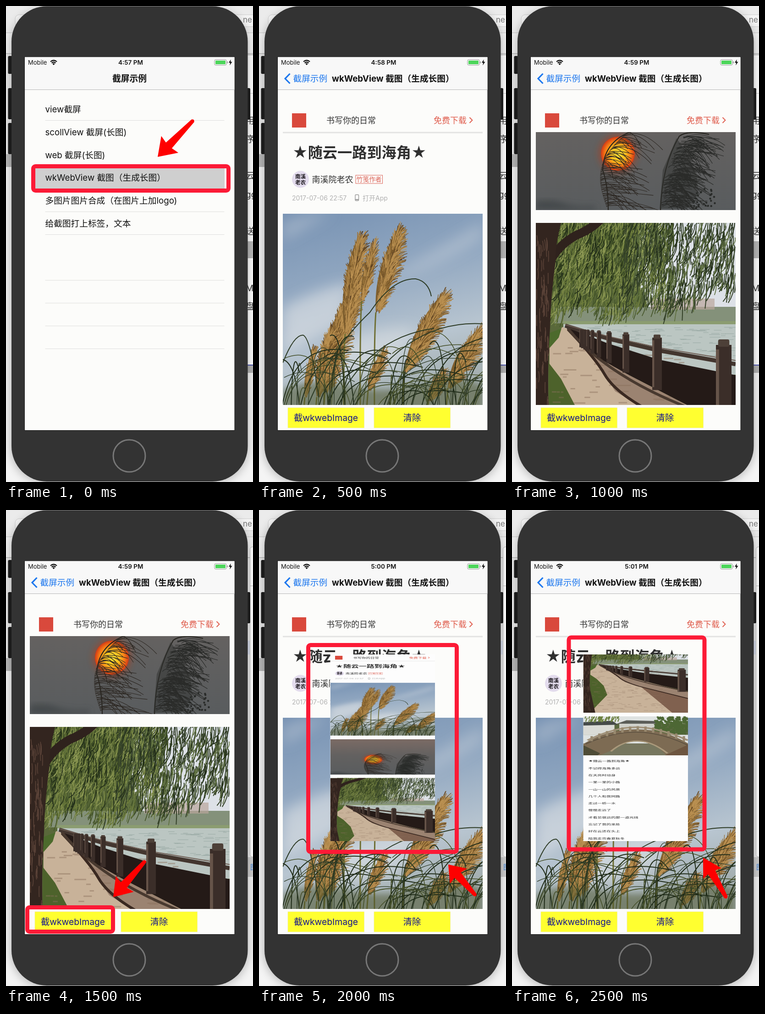
Animation of 539 by 1038 pixels, one loop 3 s. Source, as an HTML page:

```html
<!DOCTYPE html>
<html lang="zh-CN">
<head>
<meta charset="utf-8">
<title>截屏示例</title>
<style>
html, body { margin: 0; width: 100%; height: 100%; overflow: hidden; background: #fff; }
svg { display: block; }
#stage { width: 539px; height: 1038px; }
text { font-family: Inter, "Noto Sans CJK SC", "Noto Sans CJK", sans-serif; white-space: pre; }
</style>
</head>
<body>
<svg id="stage" viewBox="0 0 539 1038"></svg>
<script>
const stage = document.getElementById('stage');
const RED = '#fc1a36', BRAND = '#d9493c', INK = '#2f2f2f';

let seed = 7;
const rnd = (a = 0, b = 1) => {
  seed = (seed * 16807) % 2147483647;
  return a + (b - a) * seed / 2147483647;
};
const many = (n, f) => Array.from({ length: n }, (_, i) => f(i)).join('');
const r1 = v => v.toFixed(1);
const rect = (x, y, w, h, fill, more = '') =>
  `<rect x="${x}" y="${y}" width="${w}" height="${h}" fill="${fill}" ${more}/>`;
const poly = (pts, fill, more = '') => `<polygon points="${pts}" fill="${fill}" ${more}/>`;
const line = (d, color, w = 1, more = '') =>
  `<path d="${d}" fill="none" stroke="${color}" stroke-width="${w}" ${more}/>`;
const text = (x, y, size, s, fill = '#111', more = '') =>
  `<text x="${x}" y="${y}" font-size="${size}" fill="${fill}" ${more}>${s}</text>`;
const mid = 'text-anchor="middle"';
const show = (on, body) => `<g data-on="${on}">${body}</g>`;
const symbol = (id, h, body) =>
  `<symbol id="${id}" viewBox="0 0 436 ${h}" preserveAspectRatio="none">${body}</symbol>`;
const use = (id, x, y, w, h) =>
  `<use href="#${id}" x="${x}" y="${y}" width="${w}" height="${h}"/>`;
const frame = (x, y, w, h, s = 9) =>
  rect(x + s / 2, y + s / 2, w - s, h - s, 'none', `rx="5" stroke="${RED}" stroke-width="${s}"`);

function arrow(tx, ty, ex, ey, back = 38, wing = 26) {
  const len = Math.hypot(ex - tx, ey - ty), bx = (ex - tx) / len, by = (ey - ty) / len;
  const at = (a, p) => r1(tx + bx * a - by * p) + ',' + r1(ty + by * a + bx * p);
  return `<path fill="#fe0000" d="M${at(0, 0)}L${at(back, wing)} ${at(back - 3, 9)} ${at(len - 2, 4)}` +
    `Q${at(len + 4, 0)} ${at(len - 2, -4)}L${at(back - 3, -9)} ${at(back, -wing)}Z"/>`;
}

// Photos: each in its own 436 wide box
function plume(x1, y1, x2, y2, w) {
  const dx = x2 - x1, dy = y2 - y1, len = Math.hypot(dx, dy), ux = dx / len, uy = dy / len;
  const tones = ['#573c20', '#7c5a2b', '#957038', '#b98f50'], paths = ['', '', '', ''];
  const n = Math.round(len * w / 9);
  for (let i = 0; i < n; i++) {
    const t = rnd(0, .93), s = rnd(-1, 1);
    const hw = w * Math.sin(Math.PI * (.1 + .84 * t));
    const f = rnd(12, 28), o = s * hw * .5 + w * .15, x = x1 + dx * t - uy * o, y = y1 + dy * t + ux * o;
    paths[i % 4] += `M${r1(x)} ${r1(y)}q${r1(ux * f * .6)} ${r1(uy * f * .6)} ` +
      `${r1(ux * f - uy * o)} ${r1(uy * f + ux * o)}`;
  }
  const side = k => `${r1(x1 + dx * .45 - uy * w * k)} ${r1(y1 + dy * .45 + ux * w * k)}`;
  return line(`M${x1} ${y1}q-4 50 -3 ${430 - y1}`, '#6f6f34', 3) +
    `<path d="M${x1} ${y1}Q${side(1.2)} ${x2} ${y2}Q${side(-1.1)} ${x1} ${y1}" fill="#80602f"/>` +
    paths.map((d, i) => line(d, tones[i], 1.3)).join('');
}

function reeds() {
  const plumes = [[48, 400, 66, 297, 13], [92, 390, 133, 190, 32], [74, 400, 104, 250, 24],
    [136, 262, 166, 45, 30], [172, 190, 198, 60, 16], [203, 215, 253, 28, 27],
    [265, 345, 352, 170, 29], [360, 380, 428, 250, 27], [186, 385, 216, 305, 18], [318, 410, 346, 350, 20]];
  const blades = c => many(30, () => {
    const x = rnd(-10, 420), lean = rnd(-70, 150), h = rnd(60, 190);
    return `M${r1(x)} 432Q${r1(x + lean * .25)} ${r1(432 - h)} ${r1(x + lean * 1.5)} ${r1(432 - h * rnd(.5, 1))}`;
  });
  return rect(0, 0, 436, 430, 'url(#sky)') +
    `<g filter="url(#haze)" fill="#dfe3e6">
      <path d="M436 20Q330 85 210 150Q330 125 436 50Z" opacity=".35"/>
      <path d="M0 205Q80 160 150 150L130 240Q70 270 0 310Z" opacity=".6"/>
      <path d="M0 20Q50 0 110 -5L0 60Z" opacity=".35"/>
      <path d="M120 280Q220 240 290 250L250 340 90 370Z" opacity=".5"/></g>` +
    plumes.map(p => plume(...p)).join('') +
    `<path d="M0 430V385Q60 355 140 375T300 372T436 375V430Z" fill="#4c522c" opacity=".5" filter="url(#soft)"/>` +
    line(blades(), '#202c19', 2) + line(blades(), '#454f29', 1.6) + line(blades(), '#2e3b26', 1.3) +
    line('M0 325Q25 262 45 265Q62 275 78 400M50 430Q100 300 190 215Q240 140 290 142Q318 148 324 180' +
      'M110 430Q180 270 330 250M150 430Q260 230 436 240', '#2c3a24', 2);
}

function sunset() {
  const feather = (x, y, l, d) => `M${r1(x)} ${r1(y)}q${r1(l * .45)} ${r1(-d * .7)} ${r1(l)} ${r1(d)}`;
  const one = many(76, i => {
    const t = i / 76, y = 280 - t * 160;
    return feather(154 + 46 * t * t * t - 18 * Math.sin(t * 3), y, rnd(25, 120) * (1 - t * .25), rnd(2, 34));
  });
  const two = many(170, () => {
    const t = rnd(), y = 284 - t * 160;
    return feather(273 + 48 * t * t + rnd(0, 26), y, rnd(25, 85), rnd(0, 34));
  });
  return rect(0, 0, 436, 287, 'url(#dusk)') +
    `<path d="M0 287V268Q35 262 60 272T130 278V287Z" fill="#45494b" filter="url(#soft)"/>
     <circle cx="179" cy="164" r="42" fill="#b03c1c" opacity=".55" filter="url(#soft)"/>
     <circle cx="179" cy="164" r="37" fill="url(#sun)"/>` +
    line('M158 287Q158 235 146 200Q148 135 214 114M272 287Q275 190 313 126Q330 112 378 122', '#26241f', 2.2) +
    line(one, '#2d2823', 1.1) +
    poly('270,284 277,200 307,130 328,160 350,205 355,250 330,284', '#2e302e', 'opacity=".5"') +
    line(two, '#2a2b29', 1.2) +
    many(28, () => `<circle cx="${r1(rnd(345, 395))}" cy="${r1(rnd(238, 285))}" r="2.2" fill="#292b29"/>`);
}

function willows() {
  const strands = (n, x0, x1, top, low, color, w) => line(many(n, () => {
    const x = rnd(x0, x1), y = rnd(-20, low(x)), l = rnd(12, top);
    return `M${r1(x)} ${r1(y)}q${r1(rnd(-2, 5))} ${r1(l * .5)} ${r1(rnd(-14, 2))} ${r1(l)}`;
  }), color, w);
  const low = x => 185 + 14 * Math.sin(x / 22) - Math.max(0, x - 225) * .24;
  const shade = x => low(x) * .6;
  const posts = many(10, i => {
    const k = 1 / (1 + .66 * i + .12 * i * i);
    const x = 78 + 332 * k, w = 4 + 30 * k, y = 230 + 24 * k, h = 30 + 150 * k;
    return rect(r1(x - w / 2), r1(y + 12 * k), r1(w), r1(h), '#3b2e29') +
      rect(r1(x - w * .36), r1(y), r1(w * .72), r1(16 * k), '#4d4038', `rx="${r1(4 * k)}"`) +
      rect(r1(x - w / 2), r1(y + 22 * k), r1(w * .2), r1(h - 12), '#665449');
  });
  return rect(0, 0, 436, 616, '#59683a') +
    poly('230,0 436,0 436,200 250,195 215,110', '#dde1e7') +
    rect(40, 183, 396, 36, '#84917a') + rect(250, 165, 140, 24, '#b9a69c', 'opacity=".7"') +
    rect(60, 214, 376, 8, '#8b9c70') + rect(60, 221, 376, 110, '#bbc6c2') +
    line(many(140, () => `M${r1(rnd(90, 430))} ${r1(rnd(225, 290))}h${r1(rnd(6, 25))}`), '#9aaaa5', 1) +
    poly('58,227 30,260 28,616 436,616 436,500 240,400 150,325 80,235', '#c8b299') +
    poly('70,232 148,327 173,367 228,400 370,470 436,500 436,445 330,397 200,330', '#9b8371') +
    poly('240,405 436,500 436,616 370,616', '#80614f') +
    poly('28,305 55,340 85,397 100,470 28,616', '#4d622b') +
    poly('30,240 56,230 50,250 28,275', '#4c6a2c') +
    line(many(150, () => `M${r1(rnd(35, 330))} ${r1(rnd(270, 600))}h${r1(rnd(5, 30))}`), '#8b6f5c', 3, 'opacity=".45"') +
    line('M70 232Q130 295 150 330T232 401L436 500', '#3a2921', 6) +
    poly('64,226 155,262 268,298 436,332 436,440 330,397 200,330 120,285', '#241a17') +
    line('M64 224L160 253 268 278 436 308', '#43362f', 9) + line('M64 222L160 248 268 272 436 300', '#6d5c53', 2) +
    line('M70 230Q150 330 330 402L436 445', '#48392f', 6) + posts +
    strands(700, 30, 300, 50, shade, '#2b381a', 1.8) + strands(700, 30, 300, 45, low, '#46562a', 1.7) +
    strands(620, 30, 290, 38, low, '#6c7b3b', 1.4) + strands(330, 35, 280, 30, low, '#939e58', 1.2) +
    strands(330, 190, 436, 55, low, '#36432a', 2) + strands(200, 210, 436, 40, low, '#5f7040', 1.7) +
    strands(160, 30, 436, 40, low, '#222e19', 1.7) +
    line('M32 82Q50 48 88 27Q120 14 140 -6', '#2f221d', 19) +
    `<path d="M0 0H55Q42 50 43 84Q32 170 31 230Q24 330 29 430L50 616H0Z" fill="#33251f"/>` +
    line(many(110, () => `M${r1(rnd(1, 28))} ${r1(rnd(20, 590))}q${r1(rnd(-3, 4))} 12 0 24`), '#5b4338', 1.6);
}

function bridge() {
  const rail = many(13, i => rect(30 + i * 32, r1(172 - 92 * Math.sin(Math.PI * (i + .5) / 13)), 10, 42, '#998a70'));
  return rect(0, 0, 436, 317, '#dfe3e2') + rect(0, 60, 436, 90, '#5a6840') +
    rect(0, 66, 130, 85, '#dadbd6') + poly('0,48 120,35 145,68 0,75', '#454a49') +
    rect(150, 55, 150, 60, '#cfd0ca') + poly('140,60 180,32 300,38 315,60', '#5b5d58') +
    line(many(170, () => `M${r1(rnd(290, 436))} ${r1(rnd(-5, 130))}q8 8 5 22`), '#4d6734', 9) +
    line(many(50, () => `M${r1(rnd(0, 150))} ${r1(rnd(-8, 25))}q-4 10 -5 25`), '#6c803f', 4) +
    rect(0, 220, 436, 97, '#77775f') +
    `<path d="M0 317V225Q100 105 220 105T436 220V317H345Q300 205 225 205T125 270L70 317Z" fill="#7d6b53"/>` +
    line('M18 195Q130 88 220 88T436 195', '#a1927a', 12) + line('M10 225Q120 128 220 128T436 235', '#554a3c', 5) + rail +
    line('M115 285Q165 200 225 200T350 300', '#aa997b', 9) +
    poly('0,235 70,300 60,317 0,317', '#4e4c37') + poly('436,230 340,317 436,317', '#6d5540');
}

const headBody = rect(72, 234, 31, 31, BRAND) + text(147, 256, 18, '书写你的日常', '#333') +
  text(381, 256, 18, '免费下载', '#df5b4b') + line('M459.5 243l6 6-6 6', '#df5b4b', 1.8);
const article =
  text(73, 331, 32.2, '★随云一路到海角★', INK, 'font-weight="700"') +
  '<circle cx="90.5" cy="378" r="18.5" fill="#e3dced"/>' +
  text(90.5, 376, 11.5, '南溪', '#1b171c', mid + ' font-weight="700"') +
  text(90.5, 389, 11.5, '老农', '#1b171c', mid + ' font-weight="700"') +
  text(115.5, 385, 18, '南溪院老农', INK, 'font-weight="500"') +
  rect(211, 369, 58.5, 18, 'none', 'stroke="#dc6458"') + text(212.8, 383, 13.7, '竹笺作者', '#dc6458') +
  text(72, 423.5, 14, '2017-07-06 22:57', '#b1b1b1') +
  rect(210, 411.5, 7.5, 13, 'none', 'rx="1.5" stroke="#999" stroke-width="1.4"') + line('M210 422h8', '#999', 2) +
  text(226, 423.5, 14, '打开App', '#b1b1b1');
const rule = rect(52, 274.5, 436, 3, '#e3e3e2');

const defs = `<defs>
  <linearGradient id="sky" x2=".25" y2="1"><stop stop-color="#7792b3"/><stop offset=".4" stop-color="#92a8c1"/>
    <stop offset=".75" stop-color="#b8c5d0"/><stop offset="1" stop-color="#a4afb0"/></linearGradient>
  <linearGradient id="dusk" x2="0" y2="1"><stop stop-color="#7b6b65"/><stop offset=".45" stop-color="#636160"/>
    <stop offset="1" stop-color="#595c5e"/></linearGradient>
  <radialGradient id="sun"><stop stop-color="#ffe53a"/><stop offset=".45" stop-color="#ffbf1e"/>
    <stop offset=".75" stop-color="#f77b16"/><stop offset="1" stop-color="#d23a16"/></radialGradient>
  <filter id="soft" x="-30%" y="-30%" width="160%" height="160%"><feGaussianBlur stdDeviation="7"/></filter>
  <filter id="haze" x="-30%" y="-30%" width="160%" height="160%"><feGaussianBlur stdDeviation="15"/></filter>
  <filter id="shade" x="-10%" y="-10%" width="120%" height="120%"><feGaussianBlur stdDeviation="11"/></filter>
  <clipPath id="web"><rect x="41" y="275" width="458" height="595"/></clipPath>
  ${symbol('reeds', 430, reeds())}${symbol('sunset', 287, sunset())}
  ${symbol('willows', 616, willows())}${symbol('bridge', 317, bridge())}
  <g id="head">${headBody}</g><g id="article">${article}</g></defs>`;

const scraps = [['用', 257], ['序', 297], ['云', 377], ['gg', 418], ['送', 498], ['M', 622], ['盘', 662]];
const desk = rect(0, 0, 539, 1038, '#f4f4f4') + rect(0, 0, 539, 58, '#ebebeb') +
  rect(20, 19, 540, 26, '#f4f4f4', 'rx="9" stroke="#ccc"') +
  text(517, 36, 17, 'ne', '#777') + rect(0, 58, 539, 1, '#c5c5c5') + rect(0, 59, 539, 44, '#f2f2f2') +
  rect(0, 103, 539, 1.5, '#b5b5b5') + rect(0, 105, 14, 218, '#e9e9e9') + rect(0, 323, 14, 28, '#b9b9b9') +
  show('012', rect(520, 105, 19, 678, '#fff') + rect(520, 106, 19, 1, '#999') + rect(520, 190, 19, 1, '#ccc') +
    rect(520, 513, 19, 37, '#b9b9b9') + scraps.map(([s, y]) => text(523, y, 19, s, '#333')).join('') +
    rect(520, 782, 19, 2, '#4c54b0') + rect(520, 784, 19, 16, '#b3b3b3')) +
  show('345', rect(520, 105, 19, 678, '#efefef') + rect(520, 285, 19, 30, '#dce2f2') +
    rect(520, 757, 19, 43, '#cfcfcf') + text(533, 784, 15, '图', '#3b82d8') +
    rect(532.5, 80.5, 30, 676, '#fff', 'rx="5" stroke="#b5b5b5"') + rect(533, 165, 6, 1, '#bbb'));

const key = (x, y, h) => rect(x, y, 9, h, '#1b1b1b', 'rx="2.5"');
const phone = rect(12, 8, 515, 1030, '#000', 'rx="77" opacity=".3" filter="url(#shade)"') +
  key(4.5, 109, 39) + key(4.5, 179, 68) + key(4.5, 255, 68) + key(524, 179, 68) +
  rect(12, .5, 515.5, 1036.5, '#333', 'rx="77"') + rect(40, 110.5, 459.5, 815.5, '#1c1c1c') +
  rect(41, 111.5, 457.5, 813.5, '#fcfcfa') + rect(41, 111.5, 457.5, 71, '#f8f8f8') +
  rect(41, 182, 457.5, 1, '#b7b7b7') +
  '<circle cx="269" cy="981" r="35" fill="none" stroke="#777" stroke-width="3"/>';

const status = text(48, 128, 13, 'Mobile') +
  line('M97 121.5Q104 115.5 111 121.5M99.6 124.3Q104 120.5 108.4 124.3', '#111', 2.2) +
  poly('101.3,126 104,124.5 106.7,126 104,129', '#111') +
  `<text id="clock" x="272" y="128" font-size="13.5" font-weight="600" fill="#111" ${mid}></text>` +
  rect(455, 117, 26, 12, '#fff', 'rx="2.8" stroke="#8d8d8d"') + rect(457, 119, 22, 8, '#4cd55a', 'rx="1"') +
  rect(482.3, 121, 1.5, 4, '#8d8d8d') + poly('490.5,116.5 486,123.8 489.2,123.8 488.2,129.5 493.5,121.8 490.2,121.8', '#111');

const rows = ['view截屏', 'scollView 截屏(长图)', 'web 截屏(长图)', 'wkWebView 截图（生成长图）',
  '多图片图片合成（在图片上加logo)', '给截图打上标签，文本'];
const list = text(269.5, 165, 18.8, '截屏示例', '#111', mid + ' font-weight="700"') +
  [0, 4, 5, 7, 8, 9, 10].map(i => rect(85.5, r1(249 + i * 49.8), 391, 1, '#dededd')).join('') +
  rect(60, 350, 417, 48.5, '#cfcfcf') +
  rows.map((s, i) => text(85.5, r1(232 + i * 49.8), 18.7, s)).join('') +
  frame(55, 345, 435, 62) + arrow(331, 329, 409, 249);

const button = (x, label) => rect(x, 876, 166.5, 44, '#ffff30', 'stroke="#e9e9a0" stroke-width=".6"') +
  text(x + 83, 905, 19.3, label, '#14148c', mid);
const nav = line('M67.5 147.5L57 158.3 67.5 169', '#1b76ee', 3.2) + text(74.5, 165, 18.7, '截屏示例', '#1b76ee') +
  text(159, 165, 18.7, 'wkWebView 截图（生成长图）', '#111', 'font-weight="700"') +
  '<use href="#head"/>' + button(63, '截wkwebImage') + button(251, '清除');

const page = rule + '<use href="#article"/>' + `<g clip-path="url(#web)">${use('reeds', 52, 453, 436, 430)}</g>`;
const lower = `<g clip-path="url(#web)">${use('sunset', 52, 158, 436, 287)}${use('willows', 52, 473, 436, 616)}</g>`;

// Long capture squeezed into a preview
const SX = .524, SY = .268;
const preview = body => rect(155.5, 315, 228.5, 407, '#fdfdfd') +
  `<svg x="155.5" y="315" width="228.5" height="407" viewBox="155.5 315 228.5 407">${body}</svg>`;
const shot = (id, y, h) => use(id, 155.5, y, 228.5, h);
const squeeze = body => `<g transform="translate(${155.5 - 52 * SX} ${341 - 320 * SY}) scale(${SX} ${SY})">${body}</g>`;
const verse = ['★随云一路到海角★', '不记得海角多远', '在天亮时动身', '一里一里的小路', '一山一山的风景',
  '几个人和我同路', '走过一桥一水', '慢慢走远了', '才看见很远的那一道光线', '忘记了我的来处', '好在云还在头上', '陪我走完春夏秋冬'];
const poem = verse.map((s, i) =>
  `<g transform="translate(166.5 ${r1(549.3 + i * 15.3)}) scale(${SX} ${SY})">${text(0, 0, 19, s, '#222', 'font-weight="500"')}</g>`).join('');

stage.innerHTML = defs + desk + phone + status + show('0', list) + show('12345', nav) +
  show('145', page) + show('23', lower) +
  show('3', frame(42, 862, 196, 62) + arrow(234, 844, 304, 765)) +
  show('4', preview(squeeze(rule + '<use href="#head"/><use href="#article"/>') +
    shot('reeds', 376.6, 115.4) + shot('sunset', 500, 77) + shot('willows', 584.5, 165)) +
    frame(103, 290, 333, 460) + arrow(413, 773, 473, 841, 34, 25)) +
  show('5', preview(shot('willows', 277, 165) + shot('bridge', 450, 85) + poem) +
    frame(119.5, 273.5, 305, 471) + arrow(417, 758, 468, 846, 40, 23));

const parts = [...stage.querySelectorAll('[data-on]')];
const clock = document.getElementById('clock');
const times = ['4:57', '4:58', '4:59', '4:59', '5:00', '5:01'];
const start = performance.now();
let last = -1;

function draw() {
  const step = Math.floor((performance.now() - start) % 3000 / 500);
  if (step !== last) {
    last = step;
    parts.forEach(p => p.style.display = p.dataset.on.includes(step) ? '' : 'none');
    clock.textContent = times[step] + ' PM';
  }
  requestAnimationFrame(draw);
}
draw();
</script>
</body>
</html>
```
